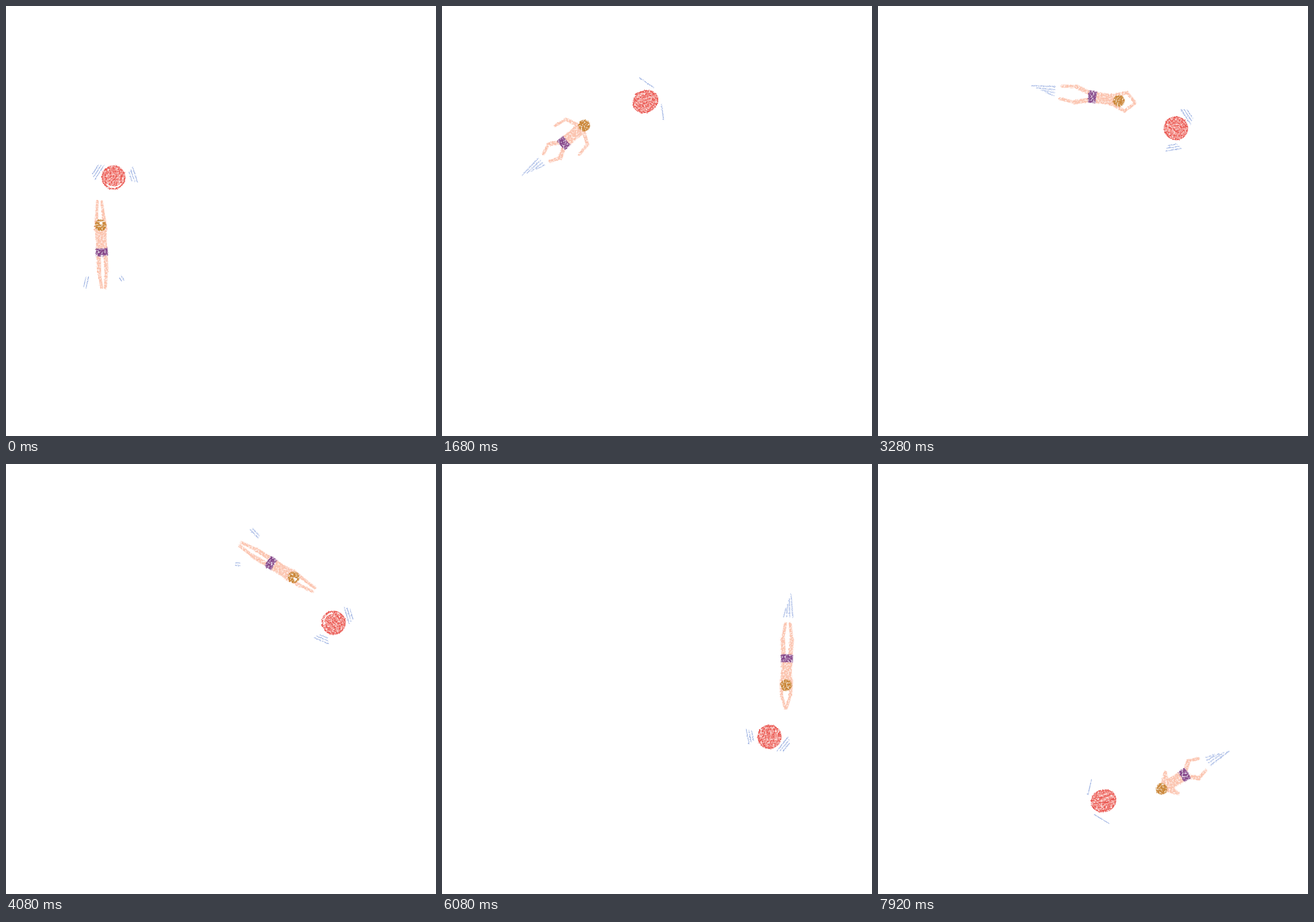
An HTML page for the animation above (8000 ms loop, 700x700 px).

```html
<!DOCTYPE html>
<html lang="en">
<head>
<meta charset="utf-8">
<title>Swimmer and ball</title>
<style>
  html, body { margin: 0; width: 100%; height: 100%; overflow: hidden; background: #fff; }
  svg { display: block; width: 100vw; height: 100vh; }
  path { stroke-linecap: round; stroke-linejoin: round; }
</style>
</head>
<body>
<svg viewBox="0 0 700 700">
  <defs>
    <filter id="crayon" filterUnits="userSpaceOnUse" x="0" y="0" width="700" height="700" color-interpolation-filters="sRGB">
      <feTurbulence id="grain" type="fractalNoise" baseFrequency="0.38" numOctaves="2" seed="1" result="noise"/>
      <feColorMatrix in="noise" values="0 0 0 0 0  0 0 0 0 0  0 0 0 0 0  2.6 0 0 0 -0.45" result="holes"/>
      <feDisplacementMap in="SourceGraphic" in2="noise" scale="3" xChannelSelector="R" yChannelSelector="G" result="rough"/>
      <feComposite in="rough" in2="holes" operator="in"/>
    </filter>
  </defs>
  <g filter="url(#crayon)">
    <g id="ball"></g>
    <g id="swimmer"></g>
  </g>
</svg>
<script>
const STEP = 80, FRAMES = 100, CYCLE = 17, STROKE = 8.5;
const CENTER = { x: 359, y: 351 };
const SKIN = '#fbc3ae', HAIR = '#c98434', SHORTS = '#85478a';
const RED = '#e9554f', PINK = '#f4918a', BLUE = '#9db2e2';

// frame, swimmer angle, ball angle
const track = [
  [0, -103.7, -68.7], [12, -74, -31.2], [30, -28.8, 15.1], [51, 20.9, 62],
  [65, 56.2, 90.9], [86, 102.4, 142.9], [99, 138, 177.6]
];

const rad = deg => deg * Math.PI / 180;
const bump = (p, mid, width) => Math.exp(-(((p - mid) / width) ** 2));
const mix = (a, b, k) => a + (b - a) * k;

function sample(rows, at) {
  let i = 0;
  while (i < rows.length - 2 && rows[i + 1][0] <= at) i++;
  const a = rows[i], b = rows[i + 1];
  const k = (at - a[0]) / (b[0] - a[0]);
  return a.map((v, j) => mix(v, b[j], k));
}

function place(angle, radius, heading) {
  const x = CENTER.x + radius * Math.sin(rad(angle));
  const y = CENTER.y - radius * Math.cos(rad(angle));
  return `translate(${x} ${y}) rotate(${heading})`;
}

const line = (d, color, width) => `<path d="${d}" fill="none" stroke="${color}" stroke-width="${width}"/>`;
const shape = (d, color) => `<path d="${d}" fill="${color}"/>`;
const oval = (x, y, rx, ry, fill, more = '') =>
  `<ellipse cx="${x}" cy="${y}" rx="${rx}" ry="${ry}" fill="${fill}" ${more}/>`;

// parallel pencil marks around a midpoint
function dashes(x, y, deg, length, count) {
  const ux = Math.cos(rad(deg)), uy = Math.sin(rad(deg));
  let d = '';
  for (let i = 0; i < count; i++) {
    const side = 4 * (i - (count - 1) / 2);
    const half = length / 2 * (1 - 0.2 * i);
    const cx = x - uy * side, cy = y + ux * side;
    d += `M${cx - ux * half} ${cy - uy * half}L${cx + ux * half} ${cy + uy * half}`;
  }
  return line(d, BLUE, 1.5);
}

function drawBall(p) {
  const stretch = bump(p, 4.5, 1.6);
  const rx = 18.5 - 1.5 * stretch, ry = 18.7 + 2 * stretch;
  let hatch = '';
  for (let i = -5; i <= 5; i++) {
    const x = i / 6 * rx;
    const h = ry * Math.sqrt(1 - i * i / 36) * 0.9;
    const bend = 3 * Math.sin(i * 2.3 + Math.floor(p));
    hatch += `M${x - bend} ${-h}Q${x + 2 * bend} 0 ${x + bend} ${h}`;
  }
  const rim = p < 0.9 ? line('M-6 14A15 15 0 0 0 15 5', '#fff', 2) : '';
  const wave = bump(p, 4, 2.6);
  const count = wave < 0.5 ? 3 : 1;
  return `<g transform="rotate(-18)">` +
    oval(0, 0, rx, ry, PINK, `stroke="${RED}" stroke-width="2"`) +
    line(hatch, RED, 1.5) + '</g>' + rim +
    dashes(mix(29, 21, wave), mix(-13, -25, wave), mix(56, 0, wave), 25, count) +
    dashes(mix(-28, -30, wave), mix(0, -6, wave), mix(98, 133, wave), 28, count);
}

// middle joint of a limb with two equal bones, bent outwards
function joint(a, b, bone, bend) {
  const dx = b.x - a.x, dy = b.y - a.y;
  const d = Math.hypot(dx, dy);
  const out = bend * Math.sqrt(Math.max(0, bone * bone - d * d / 4)) / d;
  return {
    x: (a.x + b.x) / 2 + Math.abs(dy) * out,
    y: (a.y + b.y) / 2 - Math.sign(dy) * dx * out
  };
}

function limb(side, a, b, c, upper, lower) {
  const at = q => `${side * q.x} ${q.y}`;
  return line(`M${at(a)}L${at(b)}`, SKIN, upper) + line(`M${at(b)}L${at(c)}`, SKIN, lower);
}

function wake(p, footY) {
  if (p < 3) return dashes(-28, 48, 105, 19, 2) + dashes(30, 45, 60, 8, 2);
  let d = '';
  for (let i = 0; i < 4; i++) {
    const x = -8 + 5 * i;
    d += `M${x} ${footY + 11}L${x * 0.5} ${footY + 49 - 8 * i}`;
  }
  return line(d, BLUE, 1.5);
}

function drawSwimmer(p) {
  const turn = 2 * Math.PI * p / STROKE;
  const tuck = bump(p, 4.9, 1.75);
  const shoulder = { x: 8, y: -36 }, hip = { x: 5.5, y: 5 };
  const hand = {
    x: 1 + 52 * bump(p, 2.8, 1.6),
    y: -44 - 38 * Math.cos(turn - 0.3 * Math.sin(turn))
  };
  const foot = { x: 3 + 7 * tuck + 8 * bump(p, 6.5, 0.9), y: 58 - 28 * tuck };
  const elbow = joint(shoulder, hand, 23, 0.7);
  const knee = joint(hip, foot, 27, 0.35);
  let out = '';
  for (const side of [-1, 1]) {
    out += limb(side, hip, knee, foot, 7, 5) + limb(side, shoulder, elbow, hand, 5.5, 4.5);
  }
  out += shape('M-10 -38Q0 -42 10 -38L8.5 -18L9.5 -4H-9.5L-8.5 -18Z', SKIN);
  out += shape('M-9.5 -6.5Q0 -5 9.5 -6.5L10 6Q0 8 -10 6Z', SHORTS);
  out += oval(0, -43.5, 9.5, 9.5, HAIR);
  if (p < 0.9 || (p > 3 && p < 4)) out += oval(1, -47, 2.5, 3, '#fff');
  return out + wake(p, foot.y);
}

const ball = document.getElementById('ball');
const swimmer = document.getElementById('swimmer');
const grain = document.getElementById('grain');
let shown = -1;

function render(frame) {
  const beat = frame % CYCLE;
  const p = beat % STROKE;
  const [, angle, ballAngle] = sample(track, frame);
  const radius = 207 - 4 * Math.cos(rad(angle - 15));
  swimmer.setAttribute('transform', place(angle, radius, angle + 101));
  swimmer.innerHTML = drawSwimmer(p);
  ball.setAttribute('transform', place(ballAngle, 197.5, ballAngle + 90));
  ball.innerHTML = drawBall(p);
  grain.setAttribute('seed', beat + 1);
}

const start = performance.now();
function tick() {
  const frame = Math.floor((performance.now() - start) / STEP) % FRAMES;
  if (frame !== shown) render(shown = frame);
  requestAnimationFrame(tick);
}
tick();
</script>
</body>
</html>
```
